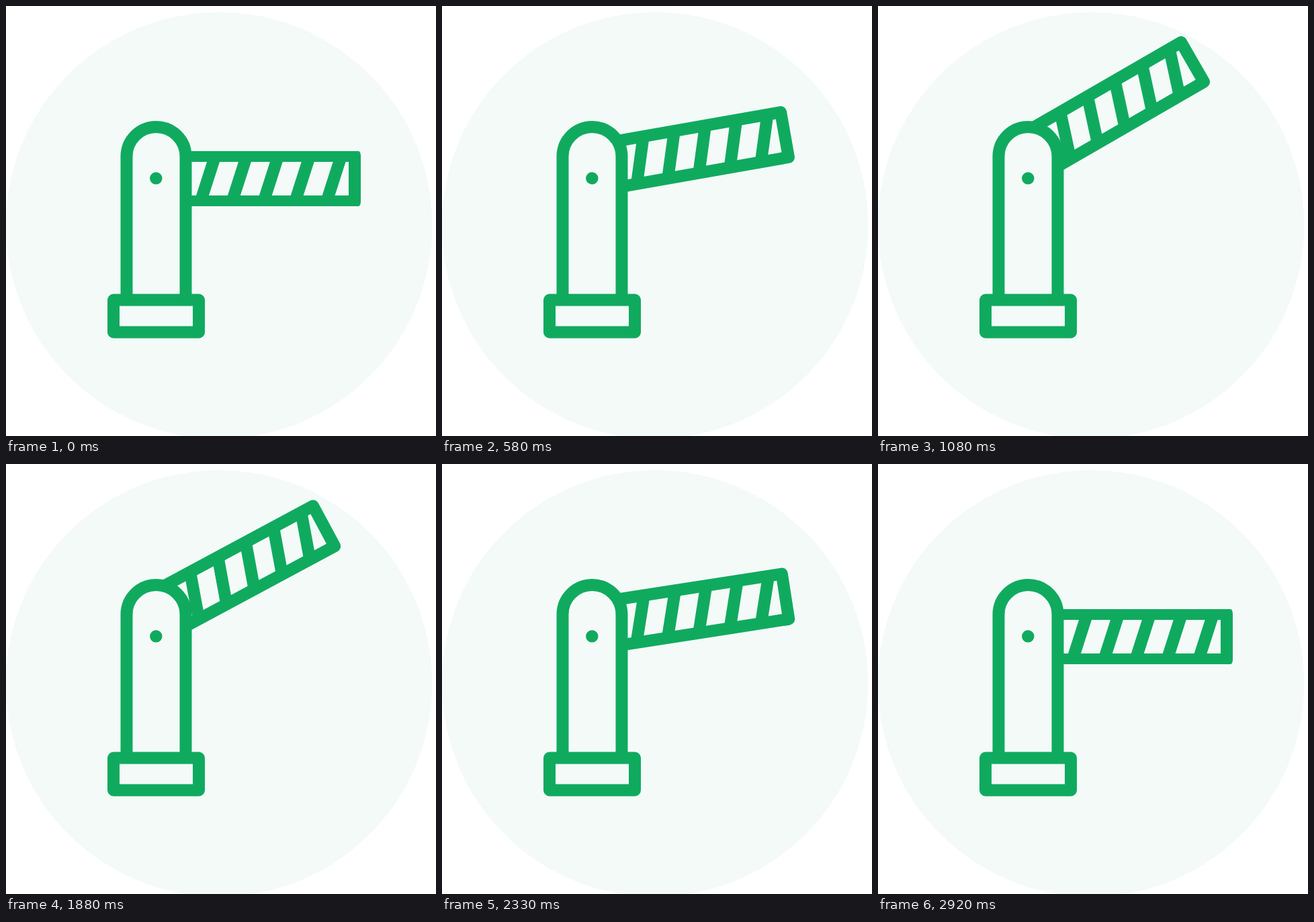
An HTML page for the animation above (3 s loop, 640 by 640 pixels).

```html
<!DOCTYPE html>
<html lang="en">
<head>
<meta charset="utf-8">
<title>Barrier gate</title>
<style>
  :root { --green: #10aa5f; --pale: #f3faf8; }
  html, body { margin: 0; width: 100%; height: 100%; overflow: hidden; background: #fff; }
  svg { display: block; width: 100%; height: 100%; }
  .line { fill: var(--pale); stroke: var(--green); stroke-width: 18; stroke-linejoin: round; }
  .pale { fill: var(--pale); }
  .green { fill: var(--green); }

  /* 72 ticks per loop, 24 per second */
  .arm, .edge { animation: 3s -4ms infinite; }
  .arm { transform-origin: 223px 257px; animation-name: slide, swing; }
  .edge { y: 214px; height: 86px; rx: 9px; ry: 9px; animation-name: trim; animation-timing-function: step-end; }

  @keyframes slide {
    0%, 1.3889% { translate: 0 0; animation-timing-function: steps(13); }
    19.4444% { translate: -4.5px -14.1px; animation-timing-function: steps(12); }
    36.1111% { translate: -11.3px -25.5px; }
    61.1111% { translate: -11.3px -25.5px; animation-timing-function: steps(12); }
    77.7778% { translate: -4.5px -14.4px; animation-timing-function: steps(14); }
    97.2222%, 100% { translate: 0 0; }
  }
  @keyframes swing {
    0% { rotate: 0deg; }
    11.1111% { rotate: 0deg; animation-timing-function: steps(18); }
    36.1111% { rotate: -30deg; }
    61.1111% { rotate: -30deg; animation-timing-function: steps(17); }
    84.7222%, 100% { rotate: 0deg; }
  }
  /* the level arm is slightly thinner */
  @keyframes trim {
    0%, 84.7222%, 100% { y: 216px; height: 82px; rx: 3.3px; ry: 7px; }
    12.5% { y: 214px; height: 86px; rx: 9px; ry: 9px; }
  }
</style>
</head>
<body>
<svg viewBox="0 0 640 640">
  <circle class="pale" cx="317" cy="326.5" r="317.3"/>
  <g class="arm">
    <rect class="green edge" x="230" width="298"/>
    <rect class="pale" x="240" y="232" width="270" height="50"/>
    <path class="line" d="M309.8 228l-18.6 58m65.5-58l-18.6 58m65.5-58l-18.6 58m65.5-58l-18.6 58m65.5-58l-18.6 58"/>
  </g>
  <path class="line" d="M179.5 438V224a44 44 0 0 1 88 0V438"/>
  <rect class="line" x="160" y="437.5" width="127" height="48"/>
  <circle class="green" cx="223.3" cy="256.4" r="9.2"/>
</svg>
</body>
</html>
```
